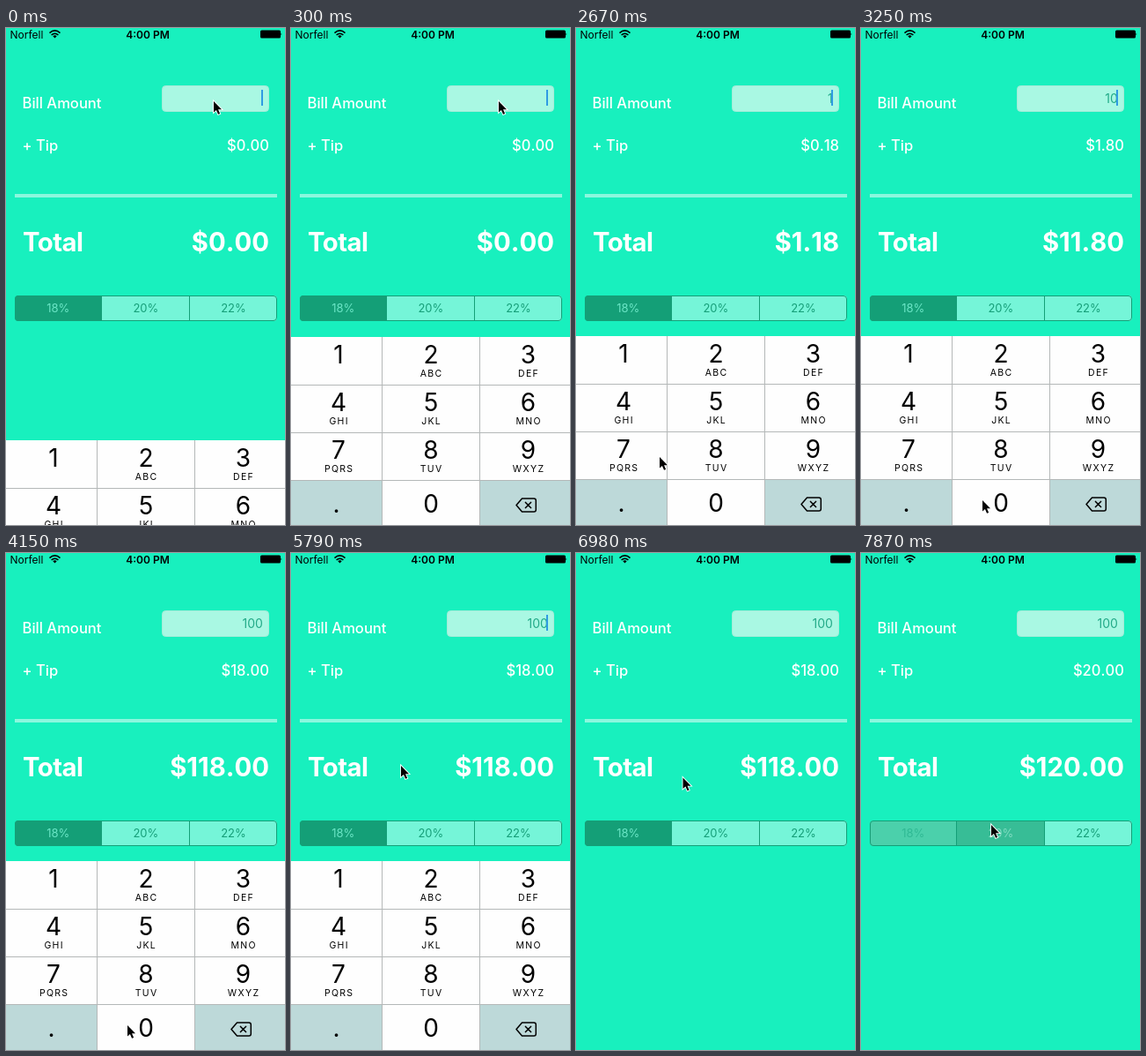
An HTML page that plays this animation: 317x563 px, repeating every 8 s.

```html
<!DOCTYPE html>
<html lang="en">
<head>
<meta charset="utf-8">
<title>Tip calculator</title>
<style>
html, body { margin: 0; height: 100%; overflow: hidden; background: #18f0be; }
svg { display: block; width: 100vw; height: 100vh; font-family: Inter, Roboto, sans-serif; }
.end { text-anchor: end; font-kerning: none; }
.mid, #keys text, #segs text { text-anchor: middle; }
.label { font-size: 16.6px; font-weight: 500; fill: #fff; }
.sum { font-size: 29.3px; font-weight: 700; fill: #fff; }
#segs text { font-size: 13px; }
.digit { font-size: 28px; }
.abc { font-size: 10.5px; letter-spacing: 1.3px; }
</style>
</head>
<body>
<svg viewBox="0 0 317 563">
  <rect width="317" height="563" fill="#18f0be"/>

  <g font-size="12">
    <text x="4.5" y="11.5">Norfell</text>
    <text class="mid" x="161" y="11.5" font-weight="600">4:00 PM</text>
  </g>
  <path d="M49.5 5.6Q55.5 .2 61.5 5.6M51.6 8Q55.5 4.5 59.4 8" fill="none" stroke="#000" stroke-width="1.6"/>
  <path d="M53.3 9.2Q55.5 7.4 57.7 9.2L55.5 11.6Z"/>
  <rect x="289" y="2.5" width="23" height="9" rx="1.5"/>
  <path d="M312.5 5.5q1.6 1.5 0 3z"/>

  <text class="label" x="18.5" y="91">Bill Amount</text>
  <rect x="177.5" y="65.5" width="121" height="29" rx="4" fill="#a9f8e3" stroke="#a4ecd8"/>
  <text id="bill" class="end" x="291.8" y="85" font-size="14" fill="#22aa88"></text>
  <rect id="caret" x="290" y="70" width="2" height="18" fill="#2f9be3"/>
  <text class="label" x="18.5" y="139">+ Tip</text>
  <text id="tip" class="label end" x="299" y="139"></text>
  <rect x="10" y="188" width="298" height="4" fill="#8bf7de"/>
  <text class="sum" x="19" y="253" letter-spacing="-.5">Total</text>
  <text id="total" class="sum end" x="299" y="253"></text>

  <clipPath id="round"><rect x="10" y="303" width="298" height="29" rx="4"/></clipPath>
  <g id="segs" clip-path="url(#round)"></g>
  <path d="M108.5 303.5v28M208.5 303.5v28" stroke="#149f77"/>
  <rect x="10.5" y="303.5" width="297" height="28" rx="3.5" fill="none" stroke="#149f77"/>

  <g id="keys"></g>
  <path id="mouse" d="M0 0V14.5L3.4 11.5 5.8 17 8.2 16 5.8 10.6H10.4Z"
    stroke="#fff" stroke-width="2" paint-order="stroke"/>
</svg>
<script>
const $ = id => document.getElementById(id);
const LOOP = 8000, TICK = 148.3; // the screen refreshes once per tick
const TEAL = '#bdd9d9';

// Keypad, laid out from its own top edge
const colX = [0, 104, 215, 317], midX = [54, 159, 269.5];
const keys = ['1', '2 ABC', '3 DEF', '4 GHI', '5 JKL', '6 MNO', '7 PQRS', '8 TUV', '9 WXYZ', '.', '0', ''];
$('keys').innerHTML = keys.map((key, i) => {
  const c = i % 3, y = 54 * (i / 3 | 0), [digit, abc = ''] = key.split(' ');
  return `<rect id="k${digit}" x="${colX[c]}" y="${y}" width="${colX[c + 1] - colX[c]}" height="54"
    fill="${i == 9 || i == 11 ? TEAL : '#fefefe'}"/>
    <text class="digit" x="${i == 9 ? 51.5 : midX[c]}" y="${y + (i > 8 ? 36.5 : 30)}">${digit}</text>
    <text class="abc" x="${midX[c] + .6}" y="${y + 45}">${abc}</text>`;
}).join('') + `<path d="M103.5 0V214M214.5 0V214M0 54.5H317M0 108.5H317M0 162.5H317" stroke="#b4b8b8"/>
  <path d="M256 190.5L262.5 183H276Q278.3 183 278.3 185.3V195.7Q278.3 198 276 198H262.5Z
    M266 187l7 7M273 187l-7 7" fill="none" stroke="#000" stroke-width="1.5" stroke-linejoin="round"/>`;

$('segs').innerHTML = [18, 20, 22].map((p, i) =>
  `<rect x="${8.5 + 100 * i}" y="303" width="100" height="29"/>
   <text x="${59.3 + 99.6 * i}" y="322">${p}%</text>`).join('');

// [tick, x, y] of the pointer tip
const path = [
  [9, 235, 81], [13, 58, 372], [15, 58, 372], [17, 94, 484], [18, 94, 484],
  [20, 137, 533], [28, 137, 533], [31, 190, 470], [35, 160, 290], [37, 160, 290],
  [39, 124, 239], [46, 124, 239], [48, 117, 266], [50, 147, 306], [60, 147, 306]
];
const blinks = [4, 7, 10, 13, 19, 21, 28, 31, 34, 37, 40];

function pointer(k) {
  const i = path.findIndex(p => p[0] > k), b = path[i], a = path[i - 1] || b;
  const u = Math.max(0, (k - a[0]) / (b[0] - a[0] || 1)), e = u * u * (3 - 2 * u);
  return [a[1] + (b[1] - a[1]) * e, a[2] + (b[2] - a[2]) * e];
}

// Share of the way left for a critically damped spring
function left(ms) {
  const s = Math.max(0, ms) * .0197;
  return (1 + s) * Math.exp(-s);
}

function paintSegs(fills, inks) {
  [...$('segs').children].forEach((el, i) =>
    el.setAttribute('fill', (i % 2 ? inks : fills)[i >> 1]));
}

function draw(t) {
  const k = Math.min(53, Math.floor((t + 10) / TICK)), now = k * TICK;
  const bill = k < 15 ? '' : k < 21 ? '1' : k < 24 ? '10' : '100';
  const tip = bill * (k < 53 ? .18 : .2);
  $('bill').textContent = bill;
  $('tip').textContent = '$' + tip.toFixed(2);
  $('total').textContent = '$' + (+bill + tip).toFixed(2);
  $('caret').style.opacity = blinks.filter(b => b <= k).length % 2 ? 0 : 1;

  const drop = now < 5864 ? left(now + 77) : 1 - left(now - 5864);
  $('keys').setAttribute('transform', `translate(0 ${Math.round(349 + 214 * drop)})`);
  $('k1').setAttribute('fill', k == 14 ? TEAL : '#fefefe');
  $('k0').setAttribute('fill', k == 20 || k == 22 || k == 23 ? TEAL : '#fefefe');

  if (k < 53) paintSegs(['#149f77', '#75f5d8', '#75f5d8'], ['#6be6c6', '#169f79', '#169f79']);
  else paintSegs(['#4bd0ab', '#37bd96', '#75f5d8'], ['#2fb994', '#80dcc2', '#169f79']);

  const [x, y] = pointer(k);
  $('mouse').setAttribute('transform', `translate(${x + 1} ${y + 2}) scale(.87)`);
}

function frame() {
  draw(performance.now() % LOOP);
  requestAnimationFrame(frame);
}
frame();
</script>
</body>
</html>
```
